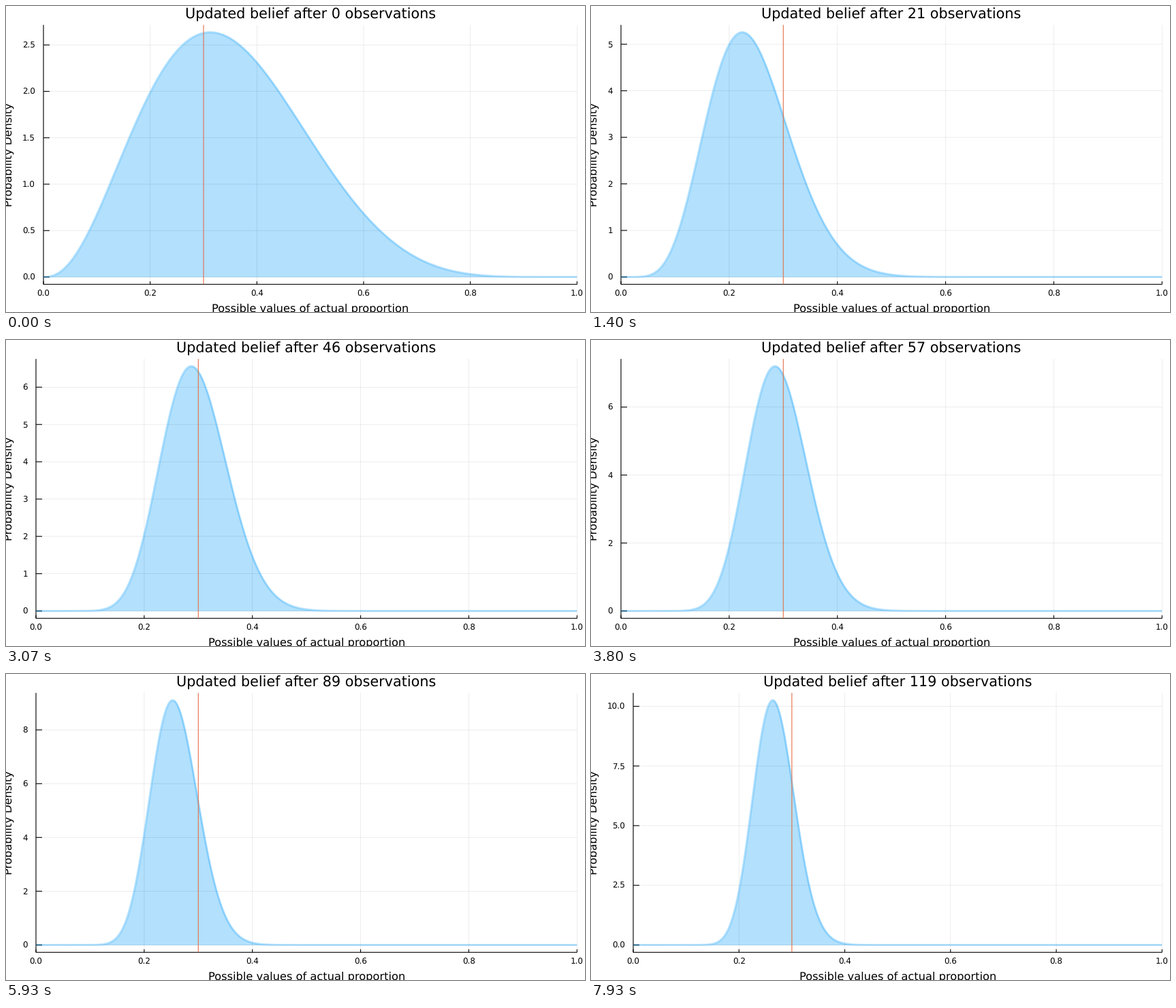
Recreate the animation shown at these times as a matplotlib script. Size 850x450 px, loop 8 s.

```python
import math

import numpy as np
import matplotlib
import matplotlib.pyplot as plt
from matplotlib.animation import FuncAnimation

matplotlib.rcParams["font.family"] = "DejaVu Sans"
matplotlib.rcParams["text.hinting"] = "none"

W, H, DPI = 850, 450, 100
LOOP_MS, TICK_MS = 8000, 20
STEPS = 120                        # observations per loop
LEAD_MS = 14                       # centres the rounding to whole ticks
PX = 72 / DPI                      # points per pixel
TOP, BOTTOM, RIGHT = 27.8, 409.3, 838.3
BLUE, ORANGE = "#009AFA", "#E36F47"
PRIOR_A, PRIOR_B = 3.5, 6.5
TRUTH = 0.3

# running number of successes, at a few counts of observations
SEEN = [0, 21, 36, 57, 76, 89, 103, 119]
HITS = [0, 4, 10, 16, 19, 22, 27, 31]

fig = plt.figure(figsize=(W / DPI, H / DPI), dpi=DPI, facecolor="white")
ax = fig.add_axes([0, 0, 1, 1])
ax.set_xlim(0, W)
ax.set_ylim(H, 0)
ax.set_autoscale_on(False)
ax.axis("off")


def beta_pdf(a, b):
    norm = math.lgamma(a + b) - math.lgamma(a) - math.lgamma(b)

    def pdf(x):
        x = np.clip(x, 1e-12, 1 - 1e-12)
        return np.exp(norm + (a - 1) * np.log(x) + (b - 1) * np.log(1 - x))
    return pdf


def adaptive_grid(f):
    """Coarse grid on [0, 1], halved where the curve bends strongly."""
    x = np.linspace(0, 1, 21)
    x[1], x[-2] = 0.0125, 0.9875
    for _ in range(7):
        y = f(x)
        slope = np.diff(y) / np.diff(x)
        bend = 2 * np.abs(np.diff(slope)) * (x[2:] - x[:-2]) / np.ptp(y)
        mid, joint = bend[::2], bend[1::2]
        total, weight = 0.5 * mid, np.full(len(mid), 0.5)
        total[1:] += 0.25 * joint
        total[:-1] += 0.25 * joint
        weight[1:] += 0.25
        weight[:-1] += 0.25
        hot = total / weight > 0.01
        hot[0], hot[-1] = hot[1], hot[-2]
        if not hot.any():
            break
        halves = (x[:-1] + x[1:]) / 2
        x = np.sort(np.concatenate([x, halves[np.repeat(hot, 2)]]))
    return x, f(x)


def tick_layout(top):
    """Tick step, label format and left edge of the plot."""
    if top < 3:
        return 0.5, "{:.1f}", 55
    if top < 7:
        return 1, "{:.0f}", 44
    if top < 10:
        return 2, "{:.0f}", 44
    return 2.5, "{:.1f}", 62


def line(x, y, color="black", width=1.1, **kw):
    ax.plot(x, y, color=color, lw=width * PX, snap=False,
            solid_capstyle="butt", solid_joinstyle="round", **kw)


def label(x, y, text, size, ha="center", angle=0):
    ax.text(x, y, text, fontsize=size * PX, color="black", ha=ha,
            va="baseline", rotation=angle, rotation_mode="anchor")


def draw_plot(n):
    hits = math.floor(np.interp(n, SEEN, HITS) + 0.5)
    x, y = adaptive_grid(beta_pdf(PRIOR_A + hits, PRIOR_B + n - hits))
    peak = y.max()
    step, fmt, left = tick_layout(1.03 * peak)

    def sx(v):
        return left + (RIGHT - left) * v

    def sy(v):
        return BOTTOM - (BOTTOM - TOP) * (v / peak + 0.03) / 1.06

    x_ticks = [(sx(i / 5), f"{i / 5:.1f}") for i in range(6)]
    y_ticks = [(sy(i * step), fmt.format(i * step))
               for i in range(int(1.03 * peak / step) + 1)]

    # grid
    grid = {"width": 0.7, "alpha": 0.1}
    for px, _ in x_ticks:
        line([px, px], [TOP, BOTTOM], **grid)
    for py, _ in y_ticks:
        line([left, RIGHT], [py, py], **grid)

    # axes, ticks and tick labels
    line([left, left], [TOP, BOTTOM])
    line([left, RIGHT], [BOTTOM, BOTTOM])
    for px, text in x_ticks:
        line([px, px], [BOTTOM, BOTTOM - 4.5])
        label(px, 427, text, 11.87)
    for py, text in y_ticks:
        line([left, left + 9], [py, py])
        label(left - 12, py + 4.4, text, 11.87, ha="right")

    # density and true proportion
    ax.fill_between(sx(x), sy(y), sy(0), color=BLUE, alpha=0.3, lw=0)
    line(sx(x), sy(y), BLUE, 3, alpha=0.3)
    line([sx(TRUTH)] * 2, [TOP, BOTTOM], ORANGE)

    # titles
    center = (left + RIGHT) / 2
    label(center, 18.3, f"Updated belief after {n} observations", 20.8)
    label(center, 449.3, "Possible values of actual proportion", 16.3)
    label(8.7, (TOP + BOTTOM) / 2 + 0.5, "Probability Density", 16.3, angle=90)


def draw(tick):
    for artist in [*ax.lines, *ax.collections, *ax.texts]:
        artist.remove()
    draw_plot((tick * TICK_MS + LEAD_MS) * STEPS // LOOP_MS)
    return []


anim = FuncAnimation(fig, draw, frames=LOOP_MS // TICK_MS,
                     init_func=lambda: draw(0), interval=TICK_MS,
                     repeat=True, repeat_delay=0, blit=False)
plt.show()
```
